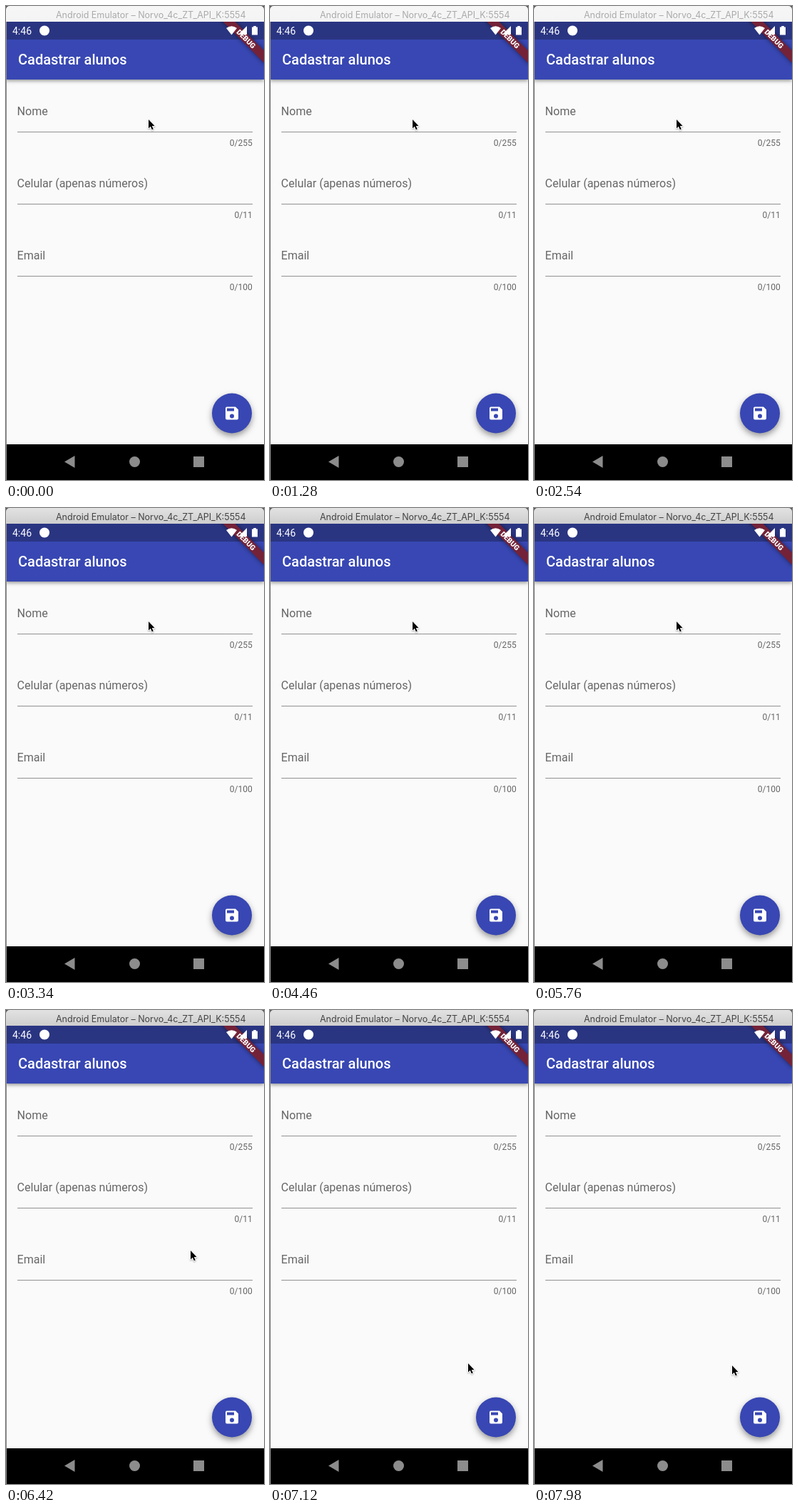
Animation, 362 px wide and 664 px high, one loop 8 s. Source, as an HTML page with a canvas:

```html
<!DOCTYPE html>
<html lang="pt">
<head>
<meta charset="utf-8">
<title>Cadastrar alunos</title>
<style>
html, body { margin: 0; width: 100%; height: 100%; overflow: hidden; background: #fafafa; }
canvas { display: block; width: 362px; height: 664px; }
</style>
</head>
<body>
<canvas id="stage"></canvas>
<script>
const W = 362, H = 664, LOOP = 8000;
const WAKE = 2780; // the window becomes active
const TOP = 22, BAR = 47, BODY = 103, NAV = 614;
const canvas = document.getElementById('stage');
const dpr = window.devicePixelRatio || 1;
canvas.width = W * dpr;
canvas.height = H * dpr;
const ctx = canvas.getContext('2d');

const PAPER = '#fafafa', INDIGO = '#3847b3', INK = '#666';
const FIELDS = [['Nome', '0/255'], ['Celular (apenas números)', '0/11'], ['Email', '0/100']];
const SAVE = new Path2D('M17 3H5a2 2 0 0 0-2 2v14a2 2 0 0 0 2 2h14a2 2 0 0 0 2-2V7zM12 19a3 3 0 1 1 0-6 3 3 0 0 1 0 6zM15 9H5V5h10z');
const ARROW = new Path2D('M0 0V12.4L2.8 9.8 4.8 14.3 6.8 13.4 4.8 9H8.6Z');

function rect(x, y, w, h, fill) {
  ctx.fillStyle = fill;
  ctx.fillRect(x, y, w, h);
}

function disc(x, y, r, fill) {
  ctx.fillStyle = fill;
  ctx.beginPath();
  ctx.arc(x, y, r, 0, Math.PI * 2);
  ctx.fill();
}

function poly(points, fill) {
  ctx.fillStyle = fill;
  ctx.beginPath();
  points.forEach(([x, y]) => ctx.lineTo(x, y));
  ctx.fill();
}

function text(str, x, y, font, fill, align = 'left') {
  ctx.font = font;
  ctx.fillStyle = fill;
  ctx.textAlign = align;
  ctx.fillText(str, x, y);
}

function shadow(color, blur, dy) {
  ctx.shadowColor = color;
  ctx.shadowBlur = blur * dpr;
  ctx.shadowOffsetY = dy * dpr;
}

const noShadow = () => shadow('transparent', 0, 0);

function titleBar(active) {
  rect(0, 0, W, TOP, '#555');
  const fill = ctx.createLinearGradient(0, 0, 0, TOP);
  fill.addColorStop(0, active ? '#e2e2e2' : '#f6f6f6');
  fill.addColorStop(1, active ? '#cecece' : '#f4f4f4');
  ctx.fillStyle = fill;
  ctx.beginPath();
  ctx.roundRect(0, 0, W, TOP, [5, 5, 0, 0]);
  ctx.fill();
  text('Android Emulator – Norvo_4c_ZT_API_K:5554', 70, 17,
    '12.5px Inter, sans-serif', active ? '#444' : '#aaa');
}

function statusBar() {
  rect(0, TOP, W, BAR - TOP, '#2a3582');
  text('4:46', 9, 40, '14px Roboto, sans-serif', '#fff');
  disc(54, 34.5, 7, '#fff');
}

function appBar() {
  shadow('rgba(0,0,0,.4)', 5, 2);
  rect(0, BAR, W, BODY - BAR, INDIGO);
  noShadow();
  text('Cadastrar alunos', 17, 82, '500 20px Roboto, sans-serif', '#fff');
}

function banner() {
  ctx.save();
  ctx.beginPath();
  ctx.rect(0, TOP, W, H);
  ctx.clip();
  ctx.translate(W - 1, TOP);
  ctx.rotate(Math.PI / 4);
  shadow('rgba(0,0,0,.5)', 6, 0);
  rect(-44, 28, 88, 12, '#742238');
  noShadow();
  text('DEBUG', 0, 37.7, '900 10.2px Roboto, sans-serif', '#fff', 'center');
  ctx.restore();
}

function statusIcons() {
  ctx.fillStyle = '#fff';
  ctx.beginPath();
  ctx.moveTo(316.5, 40.5);
  ctx.lineTo(309, 31);
  ctx.quadraticCurveTo(316.5, 25.5, 324, 31);
  ctx.fill();
  poly([[338, 28], [338, 40], [326, 40]], '#fff');
  rect(345, 29.5, 8, 11, '#fff');
  rect(347.2, 28, 3.6, 2, '#fff');
}

function form() {
  FIELDS.forEach(([label, count], i) => {
    const y = i * 101;
    text(label, 15.6, 153 + y, '16px Roboto, sans-serif', INK);
    rect(16, 176 + y, 330, 1, '#919191');
    text(count, 345.7, 196 + y, '12px Roboto, sans-serif', INK, 'right');
  });
}

function saveButton() {
  shadow('rgba(0,0,0,.4)', 8, 4);
  disc(317, 570.5, 28, INDIGO);
  noShadow();
  ctx.save();
  ctx.translate(305, 558.5);
  ctx.fillStyle = '#fff';
  ctx.fill(SAVE, 'evenodd');
  ctx.restore();
}

function navBar() {
  const tone = '#8c8c8c';
  rect(0, NAV, W, H - NAV, '#000');
  poly([[82, 638.5], [96.5, 630], [96.5, 647]], tone);
  disc(180.5, 638.5, 7.5, tone);
  rect(263, 631, 15, 15, tone);
}

function stepAt(t) {
  const since = Math.max(0, t - WAKE);
  return 3 * Math.floor(since / 140) + Math.min(2, Math.floor(since % 140 / 20));
}

function smooth(v, from, to) {
  const u = Math.min(1, Math.max(0, (v - from) / (to - from)));
  return u * u * (3 - 2 * u);
}

// The pointer sweeps down to the button, then settles a little lower.
function pointer(t) {
  const step = stepAt(t);
  const s = smooth(step, 65, 90);
  const x = 200 + 78 * (1 - Math.pow(1 - s, 1.87));
  const y = 159 + 336 * s + 3 * smooth(step, 93, 102);
  ctx.save();
  ctx.translate(Math.round(x), Math.round(y));
  ctx.lineJoin = 'round';
  ctx.lineWidth = 2;
  ctx.strokeStyle = '#fff';
  shadow('rgba(0,0,0,.3)', 2, 1);
  ctx.stroke(ARROW);
  noShadow();
  ctx.fillStyle = '#000';
  ctx.fill(ARROW);
  ctx.restore();
}

function draw(t) {
  ctx.setTransform(dpr, 0, 0, dpr, 0, 0);
  rect(0, 0, W, H, PAPER);
  form();
  appBar();
  statusBar();
  titleBar(t >= WAKE);
  banner();
  statusIcons();
  saveButton();
  navBar();
  rect(0, TOP, 1, H - TOP, '#8a8a8a');
  pointer(t);
}

const start = performance.now();
function tick() {
  draw((performance.now() - start) % LOOP);
  requestAnimationFrame(tick);
}
tick();
</script>
</body>
</html>
```
